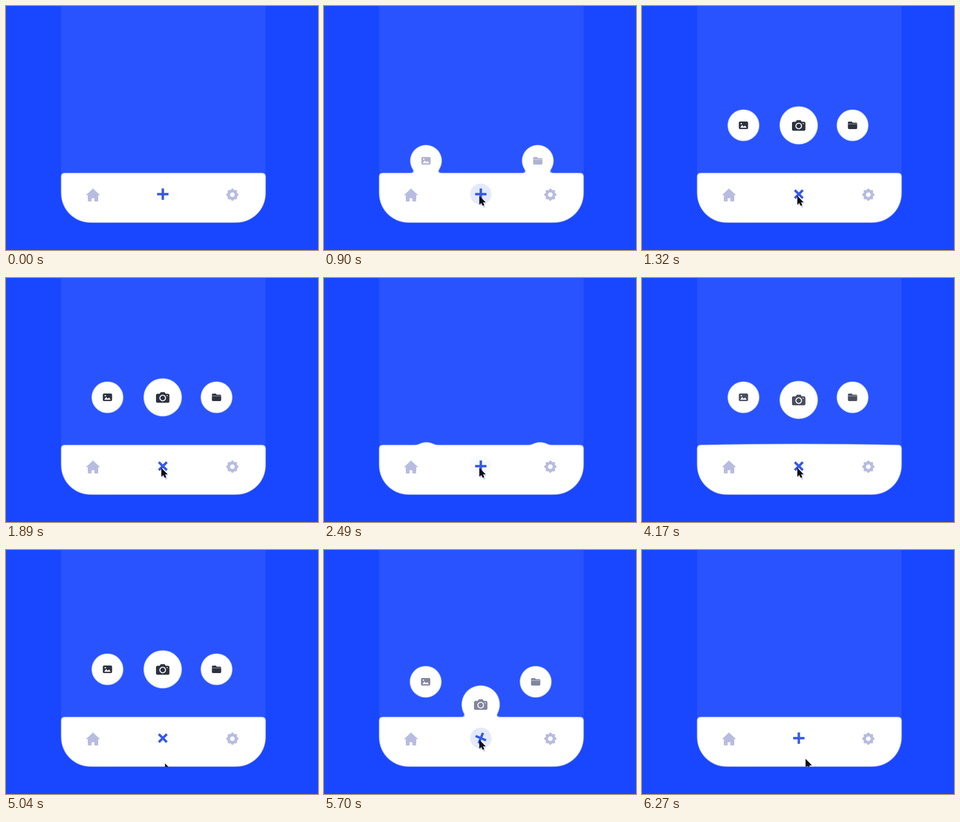
An HTML page that plays this animation: 572x450 px, repeating every 6300 ms.

```html
<!DOCTYPE html>
<html lang="en">
<head>
<meta charset="utf-8">
<title>Tab bar menu</title>
<style>
html, body { margin: 0; width: 100%; height: 100%; overflow: hidden; background: #1946ff; }
svg { display: block; width: 572px; height: 450px; }
</style>
</head>
<body>
<svg viewBox="0 0 572 450">
  <defs>
    <filter id="goo" filterUnits="userSpaceOnUse" x="0" y="0" width="572" height="450" color-interpolation-filters="sRGB">
      <feGaussianBlur stdDeviation="3.2"/>
      <feColorMatrix values="1 0 0 0 0  0 1 0 0 0  0 0 1 0 0  0 0 0 4 -1.5"/>
    </filter>
    <filter id="soft" filterUnits="userSpaceOnUse" x="0" y="0" width="572" height="450" color-interpolation-filters="sRGB">
      <feGaussianBlur stdDeviation=".65"/>
    </filter>
    <clipPath id="stage"><rect width="572" height="399.5"/></clipPath>
  </defs>
  <rect x="101" width="375" height="330" fill="#2853ff"/>
  <g fill="#fff" filter="url(#goo)">
    <path id="bar"/>
    <circle id="leftDrop" r="29.1"/>
    <circle id="midDrop" r="35.1"/>
    <circle id="rightDrop" r="29.1"/>
  </g>

  <g filter="url(#soft)">
    <g id="leftIcon">
      <rect x="-8.5" y="-7" width="17" height="14" rx="2.5"/>
      <path d="M-6 4.5 L-2.5 -.5 L.5 2.5 L3 .5 L6 4.5Z" fill="#fff"/>
      <circle cx="-4" cy="-3" r="1.3" fill="#fff"/>
    </g>
    <g id="midIcon">
      <path d="M-10 -6.5 H-5.5 L-3.5 -9.5 H3.5 L5.5 -6.5 H10 Q12.3 -6.5 12.3 -4 V7.5 Q12.3 10 10 10 H-10 Q-12.3 10 -12.3 7.5 V-4 Q-12.3 -6.5 -10 -6.5Z"/>
      <circle cy="1.3" r="5.2" fill="none" stroke="#fff" stroke-width="1.8"/>
      <circle cx="8.2" cy="-3" r="1" fill="#fff"/>
    </g>
    <g id="rightIcon">
      <path d="M-7 -6.8 H-1.5 L.5 -4.8 H7 Q8.5 -4.8 8.5 -3 V5 Q8.5 7 6.5 7 H-6.5 Q-8.5 7 -8.5 5 V-5 Q-8.5 -6.8 -7 -6.8Z"/>
      <path d="M-8.5 -2.4 H8.5" stroke="#fff" stroke-opacity=".55"/>
    </g>

    <path d="M159.5 337 L171.5 348.5 H168.5 V360 H162.5 V354 H156.5 V360 H150.5 V348.5 H147.5Z"
          fill="#b8bce0" stroke="#b8bce0" stroke-linejoin="round"/>
    <path id="gear" fill="#b8bce0" fill-rule="evenodd"/>
    <circle id="ripple" cx="287.5" cy="347" fill="#e4e9fb"/>
    <path id="plus" d="M-10.4 0 H10.4 M0 -10.4 V10.4" stroke="#355ae6" stroke-width="4.4"/>
  </g>

  <g clip-path="url(#stage)">
    <g id="cursor" filter="url(#soft)">
      <path id="arrow" d="M0 0 V16.5 L3.8 13.2 L6.6 19.5 L9.6 18.2 L6.8 12 H11.6Z"
            transform="translate(1.5 2.5)" fill="#c9cdf0"/>
      <path d="M0 0 V16.5 L3.8 13.2 L6.2 18.4 L9 17.2 L6.8 12 H11.6Z" fill="#0d0e18"/>
    </g>
  </g>
</svg>
<script>
const LOOP = 6300;
const cycles = [{ open: 735, close: 2200 }, { open: 3752, close: 5550 }];
const pointer = [
  [0, 303, 412], [60, 302, 404], [600, 284.7, 350], [4350, 284.7, 350],
  [5040, 291.5, 393.5], [5130, 293, 403], [5220, 293, 403], [5480, 284.7, 350],
  [5950, 284.7, 350], [6270, 299.7, 384.5], [6300, 303, 402]
];
const el = id => document.getElementById(id);
const ramp = (t, start, span) => Math.min(1, Math.max(0, (t - start) / span));
const ease = u => u < .5 ? 2 * u * u : 1 - 2 * (1 - u) * (1 - u);
const mix = (a, b, u) => a + (b - a) * u;
const place = (node, x, y, more = "") => node.setAttribute("transform", `translate(${x} ${y}) ${more}`);

function gearPath() {
  let d = "";
  for (let i = 0; i < 96; i++) {
    const a = i * Math.PI / 48;
    const r = 10.3 + 1.1 * Math.cos(8 * a);
    d += `${i ? "L" : "M"}${415 + r * Math.cos(a)} ${348 + r * Math.sin(a)}`;
  }
  return d + "Z M419.3 348 a4.3 4.3 0 1 0 -8.6 0 a4.3 4.3 0 1 0 8.6 0Z";
}

function drop(name, x, y, p, tone) {
  place(el(name + "Drop"), x, y);
  const icon = el(name + "Icon");
  place(icon, x, y);
  icon.setAttribute("opacity", ramp(p, .15, .25));
  icon.setAttribute("fill", `rgb(${mix(185, 46, tone)},${mix(188, 50, tone)},${mix(220, 64, tone)})`);
}

function pointerAt(t) {
  let i = 1;
  while (i < pointer.length - 1 && pointer[i][0] < t) i++;
  const [t0, x0, y0] = pointer[i - 1], [t1, x1, y1] = pointer[i];
  const u = ramp(t, t0, t1 - t0);
  return [mix(x0, x1, u), mix(y0, y1, u)];
}

function draw(t) {
  const { open, close } = t < 3400 ? cycles[0] : cycles[1];
  const move = (inDelay, inSpan, outDelay) =>
    ease(ramp(t, open + inDelay, inSpan)) * (1 - ease(ramp(t, close + outDelay, 300)));

  const side = move(0, 340, 60);
  const mid = move(160, 300, 0);
  const tone = ramp(t, open + 140, 350) * (1 - ramp(t, close, 250));
  const sideY = mix(345, 220, side);
  const drift = (sideY - 220) / 66;
  drop("left", 186 + drift, sideY, side, tone);
  drop("right", 386 + 6 * drift, sideY, side, tone);
  drop("mid", 287.3, mix(348, 220, mid), mid, tone);

  // The bar's top edge swells briefly once the middle drop lets go.
  const swell = 2 * Math.sin(Math.PI * ramp(t, open + 305, 220));
  el("bar").setAttribute("d",
    `M101 308 Q288.5 ${308 - 2 * swell} 476 308 V345.5 A54 54 0 0 1 422 399.5 H155 A54 54 0 0 1 101 345.5Z`);

  const turn = move(170, 210, 0) * 45;
  place(el("plus"), 287.5, 347, `rotate(${turn})`);

  const tap = t < close - 60 ? open - 35 : close - 50;
  const ripple = el("ripple");
  ripple.setAttribute("r", 19.5 * ease(ramp(t, tap, 160)));
  ripple.setAttribute("opacity", 1 - ramp(t, tap + 220, 160));

  place(el("cursor"), ...pointerAt(t));
}

function frame() {
  draw(performance.now() % LOOP);
  requestAnimationFrame(frame);
}

el("gear").setAttribute("d", gearPath());
frame();
</script>
</body>
</html>
```
